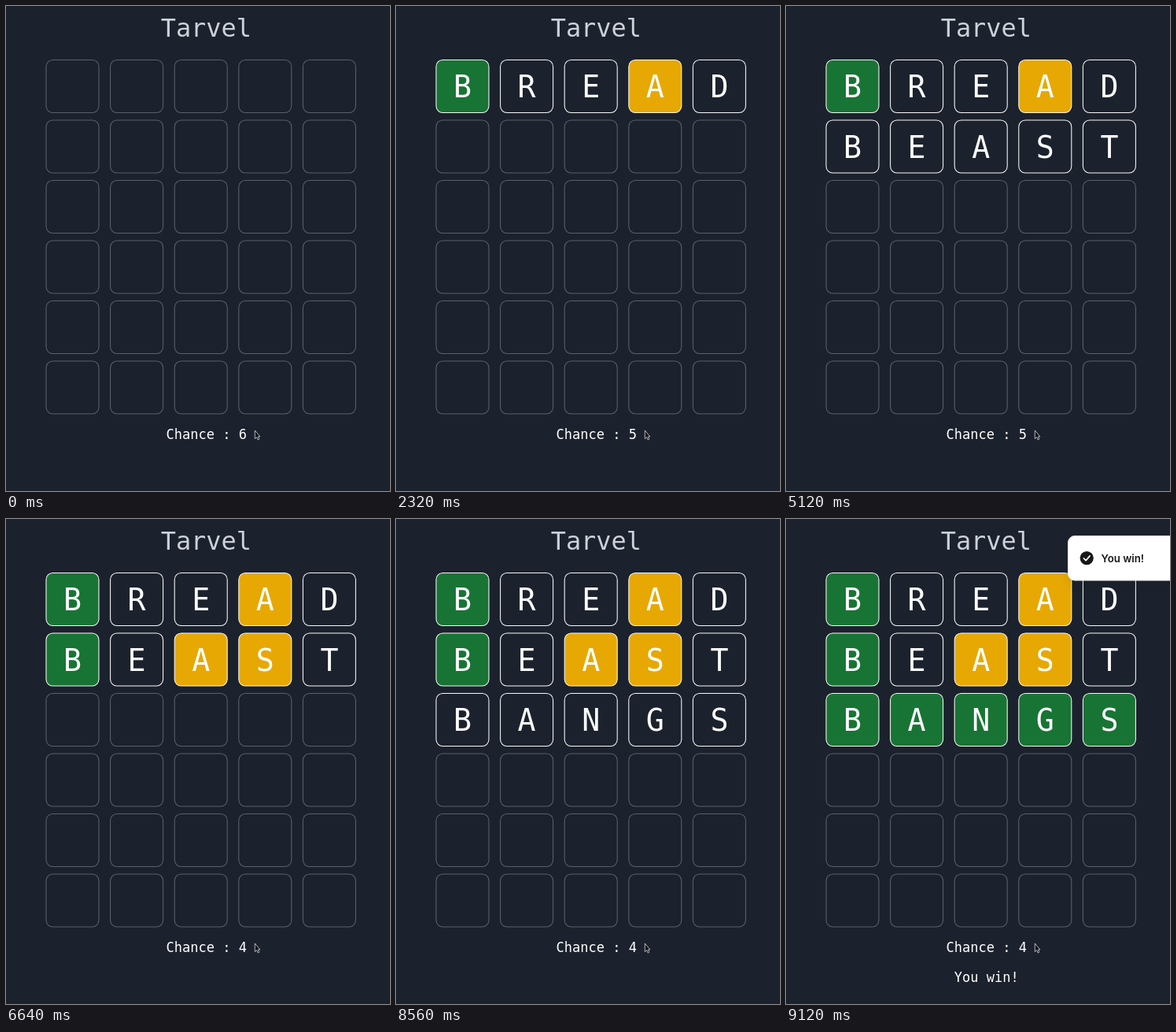
Recreate the animation shown at these times as an HTML page. Size 488 px wide and 616 px high, loop 9520 ms.

```html
<!DOCTYPE html>
<html lang="en">
<head>
<meta charset="utf-8">
<title>Word game</title>
<style>
  html, body { margin: 0; width: 100%; height: 100%; overflow: hidden; background: #1c222d; }
  svg { display: block; width: 488px; height: 616px; }
  text { font-family: "DejaVu Sans Mono", monospace; font-size: 17px; fill: #fff; text-anchor: middle; }
  .title { font-size: 31.9px; fill: #cdd1d9; }
  .cell rect { fill: transparent; stroke: #5a606c; stroke-width: 1.06; }
  .cell text { font-size: 38.25px; visibility: hidden; }
  .cell.typed rect { stroke: #f8f8f8; }
  .cell.typed text { visibility: visible; }
  .cell.hit rect { fill: #187434; }
  .cell.near rect { fill: #e7a803; }
  .toast { filter: drop-shadow(0 4px 6px rgba(0, 0, 0, .1)); }
  .toast text { font: 600 13.2px Inter, sans-serif; fill: #171717; text-anchor: start; }
</style>
</head>
<body>
<svg viewBox="0 0 488 616">
  <text class="title" x="254.3" y="38.8">Tarvel</text>
  <g id="board"></g>
  <text id="chance" x="254.7" y="550"></text>
  <text id="result" x="254.7" y="588">You win!</text>
  <path d="M316.3 539v10.6l2.3-2 1.5 3.4 1.7-.8-1.5-3.2h2.6z" fill="#11141a" stroke="#d5d7db" stroke-width=".8"/>
  <g class="toast" id="toast">
    <rect x="358.5" y="21.5" width="150" height="56.5" rx="8.5" fill="#fff" stroke="#ececec"/>
    <circle cx="382.2" cy="49.6" r="8.6" fill="#171717"/>
    <path d="M378.4 50l2.7 2.7 5-5.8" fill="none" stroke="#fff" stroke-width="1.7" stroke-linecap="round" stroke-linejoin="round"/>
    <text x="400.6" y="54.7">You win!</text>
  </g>
</svg>
<script>
  const LOOP = 9520, TICK = 80, WIN = 8600;
  // marks: h = right place, n = elsewhere in the word, - = absent
  const guesses = [
    { word: "BREAD", marks: "h--n-", typed: [80, 560, 960, 1360, 1680], reveal: 2320 },
    { word: "BEAST", marks: "h-nn-", typed: [4000, 4240, 4400, 4640, 5040], reveal: 5440 },
    { word: "BANGS", marks: "hhhhh", typed: [7040, 7280, 7520, 7920, 8320], reveal: WIN }
  ];
  const $ = id => document.getElementById(id);

  function add(parent, tag, attrs) {
    const el = document.createElementNS("http://www.w3.org/2000/svg", tag);
    for (const key in attrs) el.setAttribute(key, attrs[key]);
    return parent.appendChild(el);
  }

  const cells = [];
  for (let row = 0; row < 6; row++) {
    for (let col = 0; col < 5; col++) {
      const x = 50.5 + col * 81.6, y = 68 + row * 76.5;
      const el = add($("board"), "g", { class: "cell" });
      add(el, "rect", { x: x + .5, y: y + .5, width: 67, height: 67, rx: 8.5 });
      const guess = guesses[row];
      if (!guess) continue;
      add(el, "text", { x: x + 34, y: y + 48.3 }).textContent = guess.word[col];
      cells.push({ el, typed: guess.typed[col], reveal: guess.reveal, mark: guess.marks[col] });
    }
  }

  const slide = $("toast").animate([
    { transform: "translateY(-57px)", opacity: 0 },
    { transform: "translateY(0)", opacity: 1 }
  ], { duration: 400, easing: "ease", fill: "both" });
  slide.pause();

  function draw(t) {
    for (const { el, typed, reveal, mark } of cells) {
      el.classList.toggle("typed", t >= typed);
      el.classList.toggle("hit", mark === "h" && t >= reveal);
      el.classList.toggle("near", mark === "n" && t >= reveal);
    }
    const misses = guesses.filter(g => g.reveal < WIN && t >= g.reveal).length;
    $("chance").textContent = "Chance : " + (6 - misses);
    $("result").style.visibility = t >= WIN ? "visible" : "hidden";
    slide.currentTime = Math.min(400, Math.max(0, t - WIN));
  }

  const start = performance.now();
  function frame() {
    const t = Math.max(0, performance.now() - start) % LOOP;
    draw(Math.floor(t / TICK) * TICK);
    requestAnimationFrame(frame);
  }
  frame();
</script>
</body>
</html>
```
